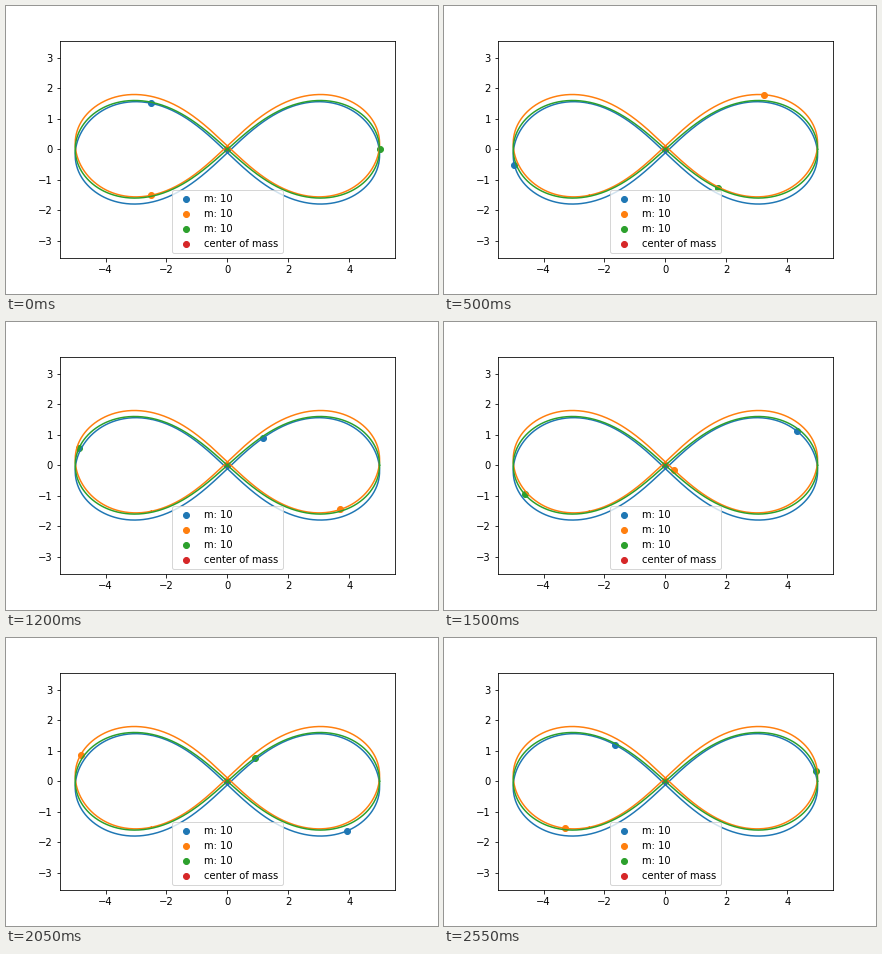
A matplotlib script that plays this animation: 432 px wide and 288 px high, repeating every 2.6 s.

```python
import numpy as np
import matplotlib.pyplot as plt
from matplotlib.animation import FuncAnimation

FRAMES, INTERVAL = 52, 50
PERIOD = 52.4            # orbital period, in frames
REACH = 4.995            # half width of the orbit
FLATTEN = 0.968          # orbit height relative to the ideal figure eight
STEPS = 1200

plt.rcParams.update({"font.family": "DejaVu Sans", "font.size": 10})


def acceleration(pos):
    acc = np.zeros_like(pos)
    for i in range(3):
        for j in range(3):
            if i != j:
                d = pos[j] - pos[i]
                acc[i] += d / np.hypot(*d) ** 3
    return acc


def figure_eight():
    """One period of the body that starts at the crossing, scaled to REACH."""
    r = np.array([0.97000436, 0.24308753])
    v = np.array([-0.93240737, 0.86473146])
    state = np.array([[r, -r, 0 * r], [-v / 2, -v / 2, v]])
    dt = 6.32591398 / STEPS

    def rate(s):
        return np.array([s[1], acceleration(s[0])])

    path = []
    for _ in range(STEPS):
        path.append(state[0, 2].copy())
        k1 = rate(state)
        k2 = rate(state + dt / 2 * k1)
        k3 = rate(state + dt / 2 * k2)
        k4 = rate(state + dt * k3)
        state = state + dt / 6 * (k1 + 2 * k2 + 2 * k3 + k4)
    path = np.array(path)
    return path * REACH / path[:, 0].max() * [1, FLATTEN]


EIGHT = figure_eight()
GRID = np.arange(STEPS) / STEPS


def body(t, lag, side):
    """Position at time t; side pushes the body up (+1), down (-1) or not (0)."""
    turn = np.asarray(t) / PERIOD
    phase = turn + lag - 0.25
    x = np.interp(phase, GRID, EIGHT[:, 0], period=1)
    y = np.interp(phase, GRID, EIGHT[:, 1], period=1)
    a = 4 * np.pi * turn
    drift = 0.14 - 0.08 * np.cos(a) - 0.025 * np.cos(2 * a)
    return x, y + side * drift


BODIES = [(1 / 3, -1), (2 / 3, 1), (0, 0)]

fig = plt.figure(figsize=(6, 4), dpi=72, facecolor="white")
ax = fig.add_axes([0.125, 0.125, 0.775, 0.755])
half_x = 1.1 * REACH
half_y = half_x * (0.755 * 288) / (0.775 * 432)
ax.set_xlim(-half_x, half_x)
ax.set_ylim(-half_y, half_y)
ax.set_xticks(range(-4, 5, 2))
ax.set_yticks(range(-3, 4))

times = np.linspace(0, PERIOD, 801)
dots = []
for i, (lag, side) in enumerate(BODIES):
    ax.plot(*body(times, lag, side), color=f"C{i}", lw=1.5)
    dots.append(ax.scatter([0], [0], color=f"C{i}", label="m: 10"))
ax.scatter([0], [0], color="C3", label="center of mass")
ax.legend(loc="lower center")


def update(frame):
    for dot, (lag, side) in zip(dots, BODIES):
        dot.set_offsets([body(frame, lag, side)])
    return dots


anim = FuncAnimation(fig, update, frames=FRAMES, interval=INTERVAL,
                     repeat=True, repeat_delay=0, blit=False)
plt.show()
```
